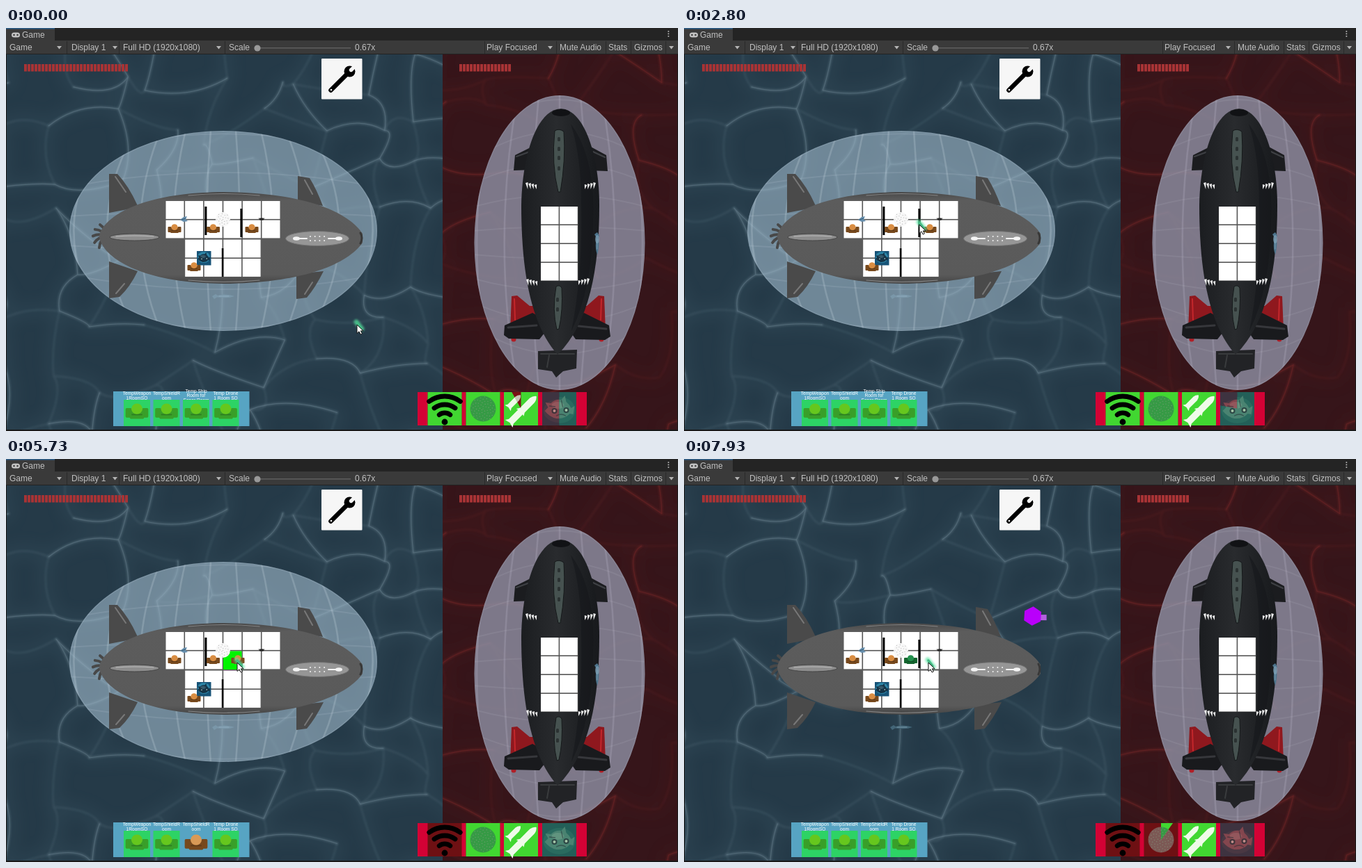
An HTML page for the animation above (8 s loop, 965 by 580 pixels).

```html
<!DOCTYPE html>
<html lang="en">
<head>
<meta charset="utf-8">
<title>Submarine game</title>
<style>
html, body { margin: 0; width: 100%; height: 100%; overflow: hidden; background: #191919; }
svg { display: block; width: 965px; height: 580px; }
text { font-family: "Liberation Sans", Arial, sans-serif; font-size: 12px; fill: #c0c0c0; }
.tag { font-size: 6.6px; fill: #fff; text-anchor: middle; }
</style>
</head>
<body>
<svg id="stage" viewBox="0 0 965 580"></svg>
<script>
const LOOP = 8000;
const PICK = 4800, CROSS = 5300, DROP = 5770, LAUNCH = 6500, SHIELD_OFF = 7440;
const stage = document.getElementById('stage');
const $ = id => document.getElementById(id);

const range = (n, fn) => Array.from({ length: n }, (_, i) => fn(i)).join('');
const rect = (x, y, w, h, fill, more = '') =>
  `<rect x="${x}" y="${y}" width="${w}" height="${h}" fill="${fill}" ${more}/>`;
const oval = (x, y, rx, ry, fill, more = '') =>
  `<ellipse cx="${x}" cy="${y}" rx="${rx}" ry="${ry}" fill="${fill}" ${more}/>`;
const path = (d, fill, more = '') => `<path d="${d}" fill="${fill}" ${more}/>`;
const line = (d, color, width, more = '') =>
  `<path d="${d}" fill="none" stroke="${color}" stroke-width="${width}" stroke-linecap="round" ${more}/>`;
const group = (x, y, body, more = '') => `<g transform="translate(${x} ${y}) ${more}">${body}</g>`;
const label = (x, y, s) => `<text x="${x}" y="${y}">${s}</text>`;

function random(seed) {
  return () => (seed = seed * 16807 % 2147483647) / 2147483647;
}

function toolbar() {
  const arrow = x => path(`M${x} 26h7l-3.5 4.5z`, '#b5b5b5');
  const words = [[5, 'Game'], [94, 'Display 1'], [168, 'Full HD (1920x1080)'], [320, 'Scale'], [501, '0.67x'],
    [690, 'Play Focused'], [795, 'Mute Audio'], [865, 'Stats'], [902, 'Gizmos']];
  return rect(0, 0, 965, 18, '#242424') + rect(0, 0, 70, 18, '#3a3a3a') + rect(0, 0, 70, 1.5, '#2c5d87') +
    rect(0, 18, 965, 20, '#3a3a3a') + rect(0, 37, 965, 1, '#222') +
    rect(8, 6.5, 12, 7, '#c4c4c4', 'rx="3.5"') + oval(11.5, 10, 1.3, 1.3, '#3a3a3a') + oval(16.5, 10, 1.3, 1.3, '#3a3a3a') +
    label(23, 14, 'Game') + range(3, i => rect(950.5, 4 + i * 3.5, 1.7, 1.7, '#bbb')) +
    [87, 162, 314, 687, 790, 861, 897, 947].map(x => rect(x, 19, 1, 18, '#2a2a2a')).join('') +
    [73, 153, 302, 778, 952].map(arrow).join('') +
    rect(361, 28, 134, 1.5, '#5e5e5e') + oval(361, 29, 4.6, 4.6, '#999') +
    words.map(([x, s]) => label(x, 32, s)).join('');
}

// A jittered net of thin, bent light veins
function water(x0, x1, seed, base, vein, haze) {
  const rnd = random(seed), step = 74, cols = Math.ceil((x1 - x0) / step) + 3, rows = 10;
  const node = Array.from({ length: cols * rows }, (_, i) =>
    [x0 - step + (i % cols + (rnd() - .5) * .9) * step, -10 + (Math.floor(i / cols) + (rnd() - .5) * .9) * step]);
  let faint = '', strong = '';
  const link = (a, b) => {
    if (!b || rnd() < .2) return;
    const bend = () => (rnd() - .5) * 46;
    const d = `M${a}Q${(a[0] + b[0]) / 2 + bend()} ${(a[1] + b[1]) / 2 + bend()} ${b}`;
    if (rnd() < .35) strong += d; else faint += d;
  };
  node.forEach((p, i) => {
    if (i % cols < cols - 1) link(p, node[i + 1]);
    link(p, node[i + cols]);
  });
  return rect(x0, 38, x1 - x0, 540, base) +
    line(faint + strong, haze, 14, 'opacity=".3" filter="url(#haze)"') +
    line(faint, vein, 2.6, 'opacity=".13" filter="url(#soft)"') +
    line(strong, vein, 3.4, 'opacity=".28" filter="url(#soft)"') +
    line(strong, vein, 1.1, 'opacity=".25" filter="url(#fine)"');
}

function shield(id, cx, cy, rx, ry, fill, net, downs, overs) {
  const spread = n => Array.from({ length: n }, (_, i) => (i - (n - 1) / 2) * 2.1 / (n - 1));
  const down = spread(downs).map(k => `M${cx + rx * k * .7} ${cy - ry}Q${cx + rx * k * 1.15} ${cy} ${cx + rx * k * .7} ${cy + ry}`);
  const over = spread(overs).map(k => `M${cx - rx} ${cy + ry * k * .7}Q${cx} ${cy + ry * k * 1.15} ${cx + rx} ${cy + ry * k * .7}`);
  return `<clipPath id="${id}Clip">${oval(cx, cy, rx, ry, '#fff')}</clipPath><g id="${id}">` +
    oval(cx, cy, rx, ry, fill) + `<g clip-path="url(#${id}Clip)">` +
    line(down.join(''), net, 2.6, 'opacity=".22" filter="url(#fine)"') +
    line(over.join(''), net, 2, 'opacity=".12" filter="url(#fine)"') + '</g>' +
    oval(cx, cy, rx - .7, ry - .7, 'none', `stroke="${net}" stroke-opacity=".15" stroke-width="1.5"`) + '</g>';
}

const cells = (x, y, cols, rows, pw, ph) =>
  range(cols * rows, i => rect(x + i % cols * pw, y + Math.floor(i / cols) * ph, pw - 1.6, ph - 1.6, '#fff'));

function crew(x, y, head, body, scale = 1) {
  return group(x, y, rect(-9.5, -3.5, 5.2, 8, body, 'rx="1"') + rect(4.3, -3.5, 5.2, 8, body, 'rx="1"') +
    rect(-6, -2, 12, 7.5, body, 'rx="1.5"') + rect(-4.5, 1.5, 9, 1, '#000', 'opacity=".22"') +
    oval(0, -2.8, 4.6, 4.4, head), `scale(${scale})`);
}
const worker = (x, y) => crew(x, y, '#d98d42', '#77491d');

function fish(body, eye) {
  const socket = (x, y) => oval(x, y, 4, 4, '#202b31', 'opacity=".7"') + oval(x, y, 2, 2, eye);
  return path('M-21 3L-16 -2L-20 -9L-12 -8Q-6 -14 3 -13L8 -19L10 -10Q15 -6 17 -1L22 -4L20 8L15 7Q8 15 -4 14Q-14 12 -21 3Z', body) +
    oval(-2, -5, 9, 5, eye, 'opacity=".25"') + socket(-7, 3) + socket(10, 2) +
    line('M-4 10Q3 6 9 10M-14 -4L-6 -3M3 -12L5 -3', '#1e292f', 1.3, 'opacity=".5"');
}

const minnow = (x, y, angle, color) =>
  group(x, y, path('M-16 0L-11 -3L-8 -1L0 -2.4Q10 -2 16 0Q8 3 -1 2L-9 1.5L-13 4Z', color) +
    line('M-6 0H8', '#89a6b5', .8), `rotate(${angle})`);

function playerShip() {
  const fin = '#4a4a4a';
  const blade = a => line('M0 0Q-9 -6 -19 -2', '#484848', 4, `transform="translate(144 300) rotate(${a})"`);
  return [-64, -34, -4, 26, 56].map(blade).join('') +
    path('M148 210L160 210Q177 228 190 258L148 266ZM148 336L189 350Q178 373 163 387L148 389Z', fin) +
    path('M419 213L436 216Q446 232 455 256L419 250ZM417 354L456 350Q444 374 432 388L417 390Z', fin) +
    line('M157 214L172 236M158 382L170 368M429 219L440 239M429 383L440 366', '#787878', 2) +
    path('M134 300C136 278 182 237 312 236C426 237 490 263 512 296V309C490 340 426 367 312 368C182 367 136 324 134 300Z',
      'url(#hull)') +
    line('M262 241Q312 236 364 241M262 363Q312 368 364 363', '#858585', 1.2) +
    line('M509 295Q513 302 509 310', '#383838', 3) +
    oval(184.5, 301, 35.5, 5, '#8d8d8d', 'stroke="#454545"') + line('M158 300Q185 298 212 300', '#bbb', 1.2) +
    oval(447, 303, 45.5, 10.5, '#969696', 'stroke="#717171"') +
    line('M418 303H432M463 303H477', '#f4f4f4', 2) + oval(417, 303, 5, 2.7, '#f4f4f4') + oval(478, 303, 5, 2.7, '#f4f4f4') +
    range(8, i => oval(437 + i % 4 * 6.7, i < 4 ? 300 : 306, 1, 1, '#f4f4f4')) +
    rect(229, 249, 165, 54, '#555') + rect(257, 304, 109, 54, '#555') +
    cells(229.5, 249, 6, 2, 27.6, 27.5) + cells(257.2, 304.5, 4, 2, 27.5, 27.5) +
    rect(0, 276.5, 26.5, 26.5, '#00f400', 'id="spot"') +
    rect(285.4, 257, 3, 41, '#000') + rect(336.4, 260, 3, 41, '#000', 'id="wall"') + rect(309.8, 317, 2.6, 41, '#000') +
    path('M250 276L255 272L260 271L258 275L261 278L255 279Z', '#668fae') + line('M252 276L258 274', '#355970', 1) +
    oval(311.5, 275.5, 10.5, 10.5, '#f8f8f8') +
    range(22, i => oval(311.5 + Math.cos(i * 2.4) * Math.sqrt(i) * 2.1, 275.5 + Math.sin(i * 2.4) * Math.sqrt(i) * 2.1,
      .7, .6, '#bcbcbc')) +
    oval(367, 275, 3.6, 1.6, '#222') + line('M363 274H371', '#333', .7) +
    rect(274, 321, 20.5, 20.5, '#175377') + oval(284, 330, 9, 8, '#2e85a6') +
    group(284, 331, fish('#153549', '#a9cfd7'), 'scale(.43)') +
    worker(242, 289.5) + worker(297.5, 289.5) + worker(270, 344.5);
}

function enemyShip() {
  const claw = (x, y, flip) => group(x, y, range(4, i => path(`M${i * 4.2} ${i}l3.6 -1l-.4 ${10 - i}z`, '#f1f1f1')), `scale(${flip} 1)`);
  const porthole = (x, y) => rect(x, y, 4, 6, '#2b3232', 'rx="1.5"');
  return path('M726 386L734 385L752 400H768V436H724ZM859 386L851 385L834 400H818V436H861Z', '#8f181e') +
    line('M730 390L731 420M855 390L854 420', '#c4272c', 2) +
    oval(729, 448, 3.5, 3.5, '#b11f27') + oval(855, 448, 3.5, 3.5, '#b11f27') +
    path('M757 170L731 183L729 205L757 204ZM838 170L862 183L864 206L838 205Z', '#1b1c1f') +
    line('M733 185L752 178M860 186L843 178', '#3e4044', 2) +
    path('M764 465L820 463L819 490L800 494L790 503L784 494L764 491Z', '#222326') +
    line('M768 469H816M780 471L777 488', '#393b3d', 2) +
    path('M756 410L716 428L715 442L722 447L766 448L784 425ZM830 410L866 428L868 444L860 449L818 448L802 425Z', '#191a1d') +
    line('M721 431L762 428M822 429L862 433', '#36373b', 3) +
    path('M797 116C831 118 852 185 852 255C852 345 838 425 792 470C752 425 740 345 740 255C741 184 762 117 797 116Z',
      'url(#dark)') + oval(797, 122, 13, 5, '#111215') +
    path('M811 138Q846 185 843 275Q842 375 812 436Q829 350 826 250Q826 184 811 138Z', '#15171a', 'opacity=".55"') +
    path('M788 148Q794 144 801 149Q804 190 796 236L793 236Q783 196 788 148Z', '#465250', 'stroke="#15191a"') +
    porthole(792, 157) + porthole(792, 171) + porthole(792, 184) + porthole(792, 199) +
    path('M790 372Q795 369 798 374Q800 406 794 433L791 434Q784 406 790 372Z', '#465250', 'stroke="#15191a"') +
    porthole(790, 388) + porthole(790, 402) +
    claw(746, 223, 1) + claw(847, 223, -1) + claw(747, 362, 1) + claw(838, 361, -1) +
    rect(768, 257, 53.5, 107, '#555') + cells(768, 257, 2, 4, 27.2, 27) +
    minnow(849, 310, 90, '#4d748c') + oval(849, 304, 3, 6, '#82a6bb', 'opacity=".65"');
}

function tray() {
  const names = [['TempWeapon', '1RoomSO'], ['TempShieldR', 'oom'], ['TempShieldR', 'oom'], ['Temp Drone', '1 Room SO']];
  const tag = (x, y, lines) => lines.map((s, i) => `<text class="tag" x="${x}" y="${y + i * 6.6}">${s}</text>`).join('');
  const green = x => rect(x - 19, 535, 38, 38, '#2dd365') + crew(x, 553, '#66c71e', '#399f29', 1.72);
  const xs = [188, 230.5, 273, 315.5];
  return rect(154, 523, 195.5, 50, '#57a4c3') +
    xs.map((x, i) => i === 2
      ? `<g id="oldTag">${tag(x, 524.5, ['Temp Ship', 'Room for', 'Sonar Room'])}</g><g id="newTag">${tag(x, 528, names[i])}</g>`
      : tag(x, 528, names[i])).join('') +
    xs.map((x, i) => `<g ${i === 2 ? 'id="taken"' : ''}>${green(x)}</g>`).join('') +
    `<g id="free">${crew(273, 553, '#d99a56', '#77491d', 1.72)}</g>`;
}

const wifi = () => {
  const arc = r => `M${-r * .6} ${-r * .8}A${r} ${r} 0 0 1 ${r * .6} ${-r * .8}`;
  return group(0, 19, line(arc(13) + arc(25) + arc(37), '#000', 6.8) + oval(0, 0, 4.4, 4.4, '#000'));
};
const orb = color => oval(0, 0, 18.5, 18.5, color) +
  range(60, i => oval(Math.cos(i * 2.4) * Math.sqrt(i) * 2.3, Math.sin(i * 2.4) * Math.sqrt(i) * 2.3, .8, .6, '#8aa184', 'opacity=".6"'));
const missiles = color => {
  const one = (x, y, s) => group(x, y, path('M-12 -5H9Q15 -4 18 0Q15 4 9 5H-12L-17 8L-15 0L-17 -8Z', color), `rotate(-45) scale(${s})`);
  return one(-10, -10, .75) + one(10, -6, .95) + one(-6, 10, .95);
};
const square = color => rect(-24.5, -24, 49, 48, color);

const icons = [
  { x: 630, off: square('#6e1013') + wifi(), on: square('#41d731') + wifi(), fill: t => t < PICK ? 1 : 0 },
  { x: 685, off: square('#6e1013') + orb('#7c5955'), on: square('#41d731') + orb('#369a45'),
    fill: t => t < SHIELD_OFF ? 1 : (t - SHIELD_OFF) / 5000 },
  { x: 739.5, off: square('#791014') + missiles('#c9c2b7'), on: square('#41d731') + missiles('#effbe9'),
    fill: t => .92 + t / 5000 },
  { x: 794.5, off: square('#3e3340') + oval(0, 3, 23, 17, '#4a3843') + fish('#84464e', '#c08a88'),
    on: square('#235f58') + oval(0, 2, 23, 19, '#2a6b5f') + fish('#4a8371', '#a4c6a7'),
    fill: t => t < LAUNCH ? .5 + t / 10000 : 0 }
];

function actions() {
  return rect(591, 524, 243, 48, '#d30235') + icons.map((c, i) => group(c.x, 548,
    `<clipPath id="clip${i}"><path id="pie${i}"/></clipPath>${c.off}<g clip-path="url(#clip${i})">${c.on}</g>`)).join('');
}

function pie(f) {
  if (f <= 0) return 'M0 0';
  if (f >= 1) return 'M-40 -40H40V40H-40Z';
  const a = f * 2 * Math.PI;
  return `M0 0V-40A40 40 0 ${f > .5 ? 1 : 0} 1 ${40 * Math.sin(a)} ${-40 * Math.cos(a)}Z`;
}

const hexagon = range(6, i => `${13.8 * Math.cos(i * Math.PI / 3)},${13.8 * Math.sin(i * Math.PI / 3)} `);

stage.innerHTML = `<defs>
  <filter id="haze" x="-10%" y="-10%" width="120%" height="120%"><feGaussianBlur stdDeviation="11"/></filter>
  <filter id="soft"><feGaussianBlur stdDeviation="1.8"/></filter>
  <filter id="fine"><feGaussianBlur stdDeviation=".6"/></filter>
  <filter id="glow" x="-100%" y="-100%" width="300%" height="300%"><feGaussianBlur stdDeviation="1.6"/></filter>
  <linearGradient id="hull" x2="0" y2="1"><stop stop-color="#484848"/><stop offset=".09" stop-color="#5c5c5c"/>
    <stop offset=".9" stop-color="#5a5a5a"/><stop offset="1" stop-color="#454545"/></linearGradient>
  <linearGradient id="dark"><stop stop-color="#1b1d20"/><stop offset=".45" stop-color="#292b2e"/><stop offset="1" stop-color="#17191c"/></linearGradient>
  <clipPath id="left">${rect(1, 38, 626, 540, '#fff')}</clipPath>
  <clipPath id="right">${rect(627, 38, 337, 540, '#fff')}</clipPath></defs>` +
  rect(0, 0, 965, 580, '#191919') + toolbar() +
  `<g clip-path="url(#left)">${water(1, 627, 4127, '#253a48', '#8aa3b0', '#3f5b6a')}</g>` +
  `<g clip-path="url(#right)">${water(627, 964, 911, '#36151a', '#96302f', '#501a1f')}</g>` +
  range(30, i => rect(26 + i * 5, 52, 4, 10.5, '#a73335')) + range(15, i => rect(651 + i * 5, 52, 4, 10.5, '#a73335')) +
  rect(453, 44, 58.5, 58.5, '#f6f6f6', 'rx="1"') +
  line('M466.5 89.5L492 64', '#000', 6.6) + oval(493.5, 62.5, 8, 8, '#000') +
  line('M495.5 60.5L504 52', '#f6f6f6', 5.4) + oval(467, 89, 1.3, 1.3, '#f6f6f6') +
  minnow(312, 386, 0, '#436577') +
  shield('shield', 312, 292, 221, 144, 'rgba(157,182,201,.62)', '#d2dfe8', 10, 6) +
  shield('foeShield', 795, 309, 122.5, 212, 'rgba(143,146,165,.8)', '#c3c1cf', 7, 10) +
  playerShip() + enemyShip() + tray() + actions() +
  `<g id="mover">${worker(0, 0)}</g><g id="ready">${crew(325.5, 289.5, '#24914e', '#14652f')}</g>` +
  `<g id="drone">${rect(9, -2, 11, 8, '#b45fdf')}<polygon id="hex" points="${hexagon}" fill="#b900fb"/></g>` +
  `<g id="cursor">${line('M-1 -4L7 6', '#58e3a0', 7, 'filter="url(#glow)" opacity=".7"')}${line('M0 -3L6 5', '#45b985', 3.5)}` +
  path('M0 0V12.5L3 9.8L5.2 14L7.4 12.9L5.4 8.9H9.2Z', '#fff', 'stroke="#111" stroke-width="1"') + '</g>';

// Each stop: time, x, y of the pointer tip
const route = [[0, 504, 427], [80, 502, 425], [800, 324, 294], [1300, 334, 281], [1670, 337, 282], [2800, 338, 283],
  [3500, 338, 284], [4100, 354, 293], [4900, 354, 293], [5500, 332, 293], [6300, 332, 293], [7100, 348, 293], [8000, 351, 293]];

function pointer(t) {
  const i = route.findIndex((p, n) => n && t <= p[0]);
  const [t0, x0, y0] = route[i - 1], [t1, x1, y1] = route[i];
  const k = (t - t0) / (t1 - t0), e = k * k * (3 - 2 * k);
  return [x0 + (x1 - x0) * e, y0 + (y1 - y0) * e];
}

const show = (id, on) => $(id).setAttribute('display', on ? 'inline' : 'none');
const move = (id, x, y) => $(id).setAttribute('transform', `translate(${x} ${y})`);

function draw(t) {
  const [x, y] = pointer(t);
  const dragging = t >= PICK && t < DROP;
  move('cursor', x, y);

  if (dragging) move('mover', x + 1, y - 3.5);
  else move('mover', t < PICK ? 353 : 325.5, 289.5);
  show('mover', t < LAUNCH);
  show('ready', t >= LAUNCH);
  show('spot', dragging);
  $('spot').setAttribute('x', t < CROSS ? 340 : 312);
  show('wall', t < CROSS || t >= DROP);

  show('oldTag', t < PICK);
  show('newTag', t >= PICK);
  show('taken', !dragging);
  show('free', dragging);

  const a = -47.7 + (t - 7200) * .0296;
  const rad = a * Math.PI / 180;
  show('drone', t >= DROP);
  move('drone', 312 + 210 * Math.cos(rad), 292 + 150 * Math.sin(rad));
  $('hex').setAttribute('transform', `rotate(${a + 60})`);

  show('shield', t < SHIELD_OFF);
  icons.forEach((c, i) => $('pie' + i).setAttribute('d', pie(c.fill(t))));
}

const start = performance.now();
function tick() {
  draw((performance.now() - start) % LOOP);
  requestAnimationFrame(tick);
}
tick();
</script>
</body>
</html>
```
